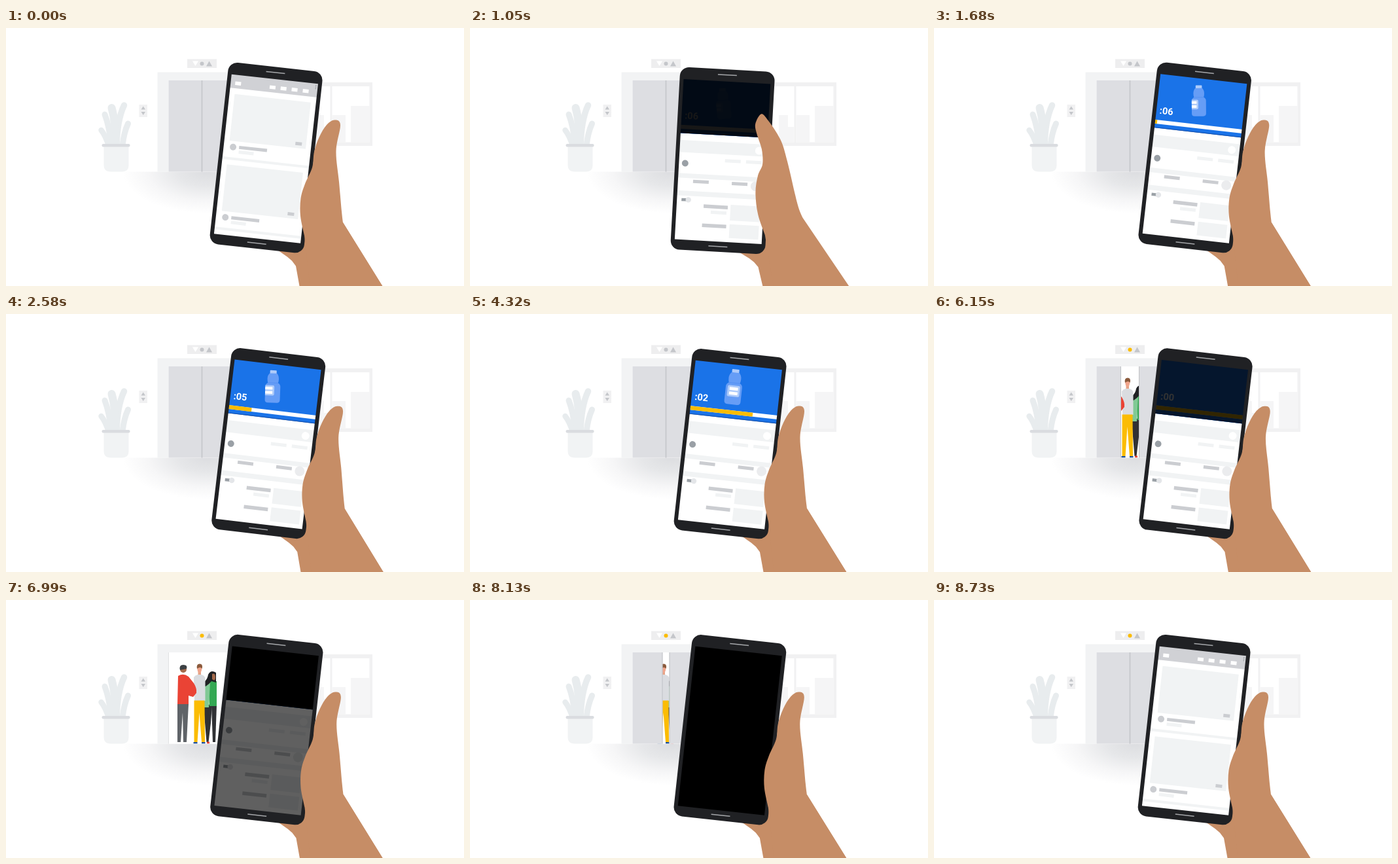
Animation, 700 px wide and 394 px high, one loop 8.76 s. Source, as an HTML page:

```html
<!DOCTYPE html>
<html lang="en">
<head>
<meta charset="utf-8">
<title>Phone by the elevator</title>
<style>
  html, body { margin: 0; width: 100%; height: 100%; overflow: hidden; background: #fff; }
  svg { display: block; width: 100vw; height: 100vh; }
  text { font: 700 14.5px Roboto, sans-serif; }
</style>
</head>
<body>
<svg viewBox="0 0 700 394">
  <defs>
    <radialGradient id="shade" gradientUnits="userSpaceOnUse" cx="0" cy="0" r="1" gradientTransform="translate(308 219) scale(130 64)">
      <stop offset="0" stop-color="#dcdde0"/>
      <stop offset=".35" stop-color="#e6e7e9"/>
      <stop offset=".7" stop-color="#f6f6f7"/>
      <stop offset="1" stop-color="#fff"/>
    </radialGradient>
    <clipPath id="doorway"><rect x="248.5" y="80" width="102" height="139.5"/></clipPath>
    <clipPath id="bodyClip"><rect x="-12.5" y="-6" width="25" height="33" rx="4"/></clipPath>
  </defs>

  <!-- window -->
  <path d="M435 83H560V180H435Z" fill="#f1f1f2"/>
  <path d="M440 89H495.5V174.500H440ZM498.500 89H555.500V174.500H498.500Z" fill="#fff"/>
  <path d="M472 174.500V133H486V151H495.500V174.500ZM498.500 174.500V133H519V174.500ZM527 174.500V119H555.500V174.500Z" fill="#f5f5f6"/>

  <!-- elevator -->
  <path d="M178 219.500H438V284H178Z" fill="url(#shade)"/>
  <rect x="231.500" y="67.500" width="136" height="152" fill="#f2f3f4"/>
  <g clip-path="url(#doorway)">
    <rect x="248" y="80" width="103" height="140" fill="#fff"/>
    <g id="people">
      <g>
        <path d="M302 163L315 158L313 188L309.500 217H306.500Z" fill="#303134"/>
        <path d="M314 160H322L320 217H316Z" fill="#303134"/>
        <path d="M309 124H322V162H311Z" fill="#34a853"/>
        <path d="M304 128Q308 124 312 126L310 164H301.500Z" fill="#81c995"/>
        <path d="M303 125Q301 130 305 132Q311 128 314 124L321 126V111Q313 106 309 114Q308 121 303 125Z" fill="#202124"/>
        <path d="M315 113Q320 111 320 118T315 121Z" fill="#a56a4b"/>
        <path d="M307 216.500H311V219.500H307Z" fill="#ea4335"/>
      </g>
      <g>
        <path d="M293.500 109H298V116H293.500Z" fill="#e6a487"/>
        <ellipse cx="295.800" cy="105" rx="3.500" ry="6" fill="#f0a58c"/>
        <path d="M292 105Q290.500 97.500 296 97.500T299.500 105Q297 101 292 105Z" fill="#8a5a3c"/>
        <path d="M287 118Q289 115 293 114H298.500Q303 115 304.500 119V154H288Z" fill="#dadce0"/>
        <path d="M287.500 153.500H303.500L304 217H299L295.500 172L292.500 217H287.500Z" fill="#fbbc04"/>
        <path d="M286.500 217H292.500V219.500H286.500ZM299 217H304.500V219.500H299Z" fill="#1a4fa0"/>
      </g>
      <g>
        <circle cx="271" cy="106" r="5" fill="#a56a4b"/>
        <path d="M266 107Q264 99 271 99T276 105Z" fill="#3c4043"/>
        <path d="M263 116Q271 111 279 117L287 127Q292 135 291 142L286 148L279 146V160H262Z" fill="#ea4335"/>
        <path d="M262 159H279L276 217H271L270 172L267 217H262Z" fill="#5f6368"/>
      </g>
    </g>
    <g id="doorL"><rect x="197" y="80" width="102.500" height="140" fill="#dddee2"/><path d="M299.200 80V220" stroke="#bfc1c5"/></g>
    <g id="doorR"><rect x="299.500" y="80" width="102" height="140" fill="#dddee2"/><path d="M299.800 80V220" stroke="#bfc1c5"/></g>
  </g>
  <rect x="277" y="47.500" width="45" height="13.500" fill="#eeeeef"/>
  <path d="M285 50.500H294L289.500 58Z" fill="#fff"/>
  <path d="M306 58.500H315L310.500 50.500Z" fill="#c4c6ca"/>
  <circle id="lamp" cx="299.500" cy="54.500" r="3"/>
  <rect x="203.500" y="117" width="12.500" height="19" fill="#f1f1f2"/>
  <path d="M206.500 124.500H213L209.700 119.500ZM206.500 128H213L209.700 133Z" fill="#c4c6ca"/>

  <!-- plant -->
  <g fill="none" stroke="#e8ecee" stroke-linecap="round">
    <path d="M169 180Q170 140 180.500 118" stroke-width="9.500"/>
    <path d="M167 180Q168 145 161.500 122" stroke-width="12"/>
    <path d="M161 180Q158 150 151 132" stroke-width="9"/>
    <path d="M157 180Q152 164 145.500 156" stroke-width="8.500"/>
    <path d="M178 180Q180 160 186.500 146" stroke-width="9"/>
  </g>
  <path d="M149.500 180H187.500V209Q187.500 219.500 177 219.500H160Q149.500 219.500 149.500 209Z" fill="#f1f3f4"/>
  <rect x="146.500" y="177" width="43" height="4.500" rx="2" fill="#dadce0"/>

  <g id="arm">
    <path d="M457 450L448.500 394L443 363.500L437 355.500L430 349.500L415 339L452 300L515 297L607 445Z" fill="#c68d66"/>
    <g transform="translate(397.600 198.200) rotate(6.300)">
      <rect x="-68" y="-122" width="136" height="247" fill="#fff"/>
      <g id="feed"></g>
      <g id="detail">
        <rect x="-68" y="-122" width="136" height="247" fill="#fff"/>
        <rect x="-68" y="-122" width="136" height="83.500" fill="#1a73e8"/>
        <path d="M-68-39H68" stroke="#174ea6"/>
        <g id="bottle">
          <path d="M-5-23H5Q9.500-19 9.500-13Q9.500-9 8.500-6Q12.500-4 12.500 0V22Q12.500 27 7.500 27H-7.500Q-12.500 27-12.500 22V0Q-12.500-4-8.500-6Q-9.500-9-9.500-13Q-9.500-19-5-23Z" fill="#669df6"/>
          <path d="M-8.500-6H8.500" stroke="#5490f2"/>
          <rect x="-5.500" y="-27" width="11" height="5" rx="1" fill="#aecbfa"/>
          <g clip-path="url(#bodyClip)">
            <g id="label">
              <rect x="-9.500" y="-2" width="19" height="17" rx="2.500" fill="#aecbfa"/>
              <path d="M-6.500 3H6.500M-6.500 10H6.500" stroke="#fff" stroke-width="4.500"/>
            </g>
          </g>
        </g>
        <text id="count" x="-61.600" y="-60.700" fill="#fff"></text>
        <rect x="-68" y="-51" width="136" height="6" fill="#fff"/>
        <rect id="progress" x="-66.500" y="-51" height="6" fill="#fbbc04"/>
        <rect id="videoDark" x="-68" y="-122" width="136" height="83.500"/>
        <g id="list"></g>
      </g>
      <rect id="sleep" x="-68" y="-122" width="136" height="247"/>
      <path d="M-58.500-139.500H58.500a14 14 0 0 1 14 14V125.500a14 14 0 0 1-14 14H-58.500a14 14 0 0 1-14-14V-125.500a14 14 0 0 1 14-14ZM-66.500-121V124H66.500V-121Z" fill="#202124" fill-rule="evenodd"/>
      <path d="M-14.500-131H14.500M-14.500 131.300H14.500" stroke="#a5a7aa" stroke-width="1.500"/>
    </g>
    <path id="thumb" fill="#c68d66"/>
  </g>
</svg>
<script>
const LOOP = 8760;
const $ = id => document.getElementById(id);
const set = (id, name, value) => $(id).setAttribute(name, value);
const LIGHT = '#f1f3f4', MID = '#cbcdd1', DARK = '#9aa0a6';

// corner-based box, centred bar and dot, all in phone coordinates
const box = (x, y, w, h, fill) => `<rect x="${x}" y="${y}" width="${w}" height="${h}" fill="${fill}"/>`;
const bar = (x, y, w, h, fill) => box(x - w / 2, y - h / 2, w, h, fill);
const dot = (x, y, r, fill) => `<circle cx="${x}" cy="${y}" r="${r}" fill="${fill}"/>`;
const band = (y, h, fill = LIGHT) => box(-68, y, 136, h, fill);

const card = y =>
  box(-58.5, y, 117, 71.5, LIGHT) + bar(47, y + 64.7, 10, 5, MID) +
  dot(-52, y + 80.7, 5, MID) + bar(-21.4, y + 80.3, 43, 5, MID) +
  bar(-31.2, y + 87.5, 23, 5, LIGHT) + band(y + 96.5, 4);

$('feed').innerHTML =
  band(-122, 21.7, '#d0d1d5') +
  [-55, -2, 14.8, 31.8, 48.9].map(x => bar(x, -108, 9, 5.5, '#fff')).join('') +
  [-118.2, -115.7, -113.2].map(y => dot(63.6, y, .7, '#80868b')).join('') +
  card(-91.5) + card(16.5);

$('list').innerHTML =
  band(-28, 18.5) + dot(54.8, -18.1, 6, '#fff') +
  dot(-57, 7.2, 5, DARK) + bar(15.6, 0, 24, 5, LIGHT) + bar(47.8, 0, 24, 5, LIGHT) +
  band(22.5, 7) +
  bar(-31.4, 34.1, 24, 5, MID) + bar(27.9, 34.1, 24, 5, MID) + dot(52.3, 36.5, 7.5, '#ebecee') +
  band(49, 7.5) +
  bar(-55.5, 62.8, 8, 4.5, DARK) + dot(-49, 62.7, 4.2, '#e4e6e9') +
  bar(-6.7, 71.1, 37, 5.5, MID) + bar(-1.8, 79.7, 24, 5, LIGHT) + box(16, 66.7, 45, 24, LIGHT) +
  bar(-7.5, 100.4, 37, 5.5, MID) + box(16, 96.5, 45, 21, LIGHT);

// value at time t between [time, value] keys, eased in and out
function track(t, keys) {
  if (t <= keys[0][0]) return keys[0][1];
  for (let i = 1; i < keys.length; i++) {
    const [t0, v0] = keys[i - 1], [t1, v1] = keys[i];
    if (t < t1) {
      const u = (t - t0) / (t1 - t0);
      return v0 + (v1 - v0) * u * u * (3 - 2 * u);
    }
  }
  return keys[keys.length - 1][1];
}

// thumb outline: relaxed x, y and the shift when bent
const OUTLINE = [
  [456, 317, 0, -2], [450, 287, -3, -4], [450.5, 260, -5.5, -10], [457, 238, -7, -14],
  [468, 213, -10, -6], [471, 189, -13, -5], [479, 166, -27.5, -6], [490, 148, -40, -3],
  [502, 140.5, -43, -10], [511, 148, -43, -10], [504.5, 188, -17.5, -18],
  [509, 235, -13, -31], [513, 280, -5, -10], [515, 297, 0, -5]
];

function thumbPath(bend) {
  const p = OUTLINE.map(([x, y, dx, dy]) => [x + dx * bend, y + dy * bend]);
  let d = `M${p[0]}`;
  for (let i = 0; i < p.length - 1; i++) {
    const a = p[Math.max(i - 1, 0)], b = p[i], c = p[i + 1], e = p[Math.min(i + 2, p.length - 1)];
    const c1 = [0, 1].map(k => b[k] + (c[k] - a[k]) / 6);
    const c2 = [0, 1].map(k => c[k] - (e[k] - b[k]) / 6);
    d += `C${c1} ${c2} ${c}`;
  }
  return d + 'L607 445L470 445Z';
}

// the tap leans about the wrist, the idle sway about the elbow
const LEAN = [[150, 0], [600, 8.5], [815, 8.5], [1215, 0]];
const SWAY = [[1215, 0], [2500, .5], [3700, -.05], [4400, 0], [5900, .35], [7600, 0], [8200, -.03], [LOOP, 0]];
const BEND = [[100, 0], [550, 1.7], [850, 1.7], [1300, 0]];
const DOORS = [[5867, 0], [6700, 51], [7463, 51], [8296, 0]];
const VIDEO_DARK = [[950, 1], [1500, 0], [5700, 0], [6330, 1]];
const SLEEP = [[6700, 0], [7200, 1], [8150, 1], [8600, 0]];

function draw(t) {
  set('arm', 'transform', `rotate(${track(t, SWAY)} 471 620) rotate(${-track(t, LEAN)} 471 411)`);
  set('thumb', 'd', thumbPath(track(t, BEND)));

  const gap = track(t, DOORS);
  set('doorL', 'transform', `translate(${-gap} 0)`);
  set('doorR', 'transform', `translate(${gap} 0)`);
  set('people', 'visibility', gap > 0 ? 'visible' : 'hidden');
  set('lamp', 'fill', t >= 5800 ? '#fbbc04' : '#c4c6ca');

  set('detail', 'opacity', t < 7600 ? track(t, [[800, 0], [900, 1]]) : 0);
  set('videoDark', 'opacity', track(t, VIDEO_DARK));
  set('sleep', 'opacity', track(t, SLEEP));

  const played = Math.min(Math.max((t - 1595) / 3785, 0), 1);
  $('count').textContent = ':0' + Math.ceil(6 * (1 - played));
  set('progress', 'width', 133 * played);

  const turn = played - .72;
  set('bottle', 'transform', `translate(-3.7 -87) rotate(${turn * 10}) scale(${1 + turn * .18})`);
  set('bottle', 'opacity', track(t, [[950, 0], [1200, 1], [5400, 1], [5900, 0]]));
  set('label', 'transform', `translate(${turn * 15} 0)`);
}

const start = performance.now();
function tick() {
  draw((performance.now() - start) % LOOP);
  requestAnimationFrame(tick);
}
tick();
</script>
</body>
</html>
```
